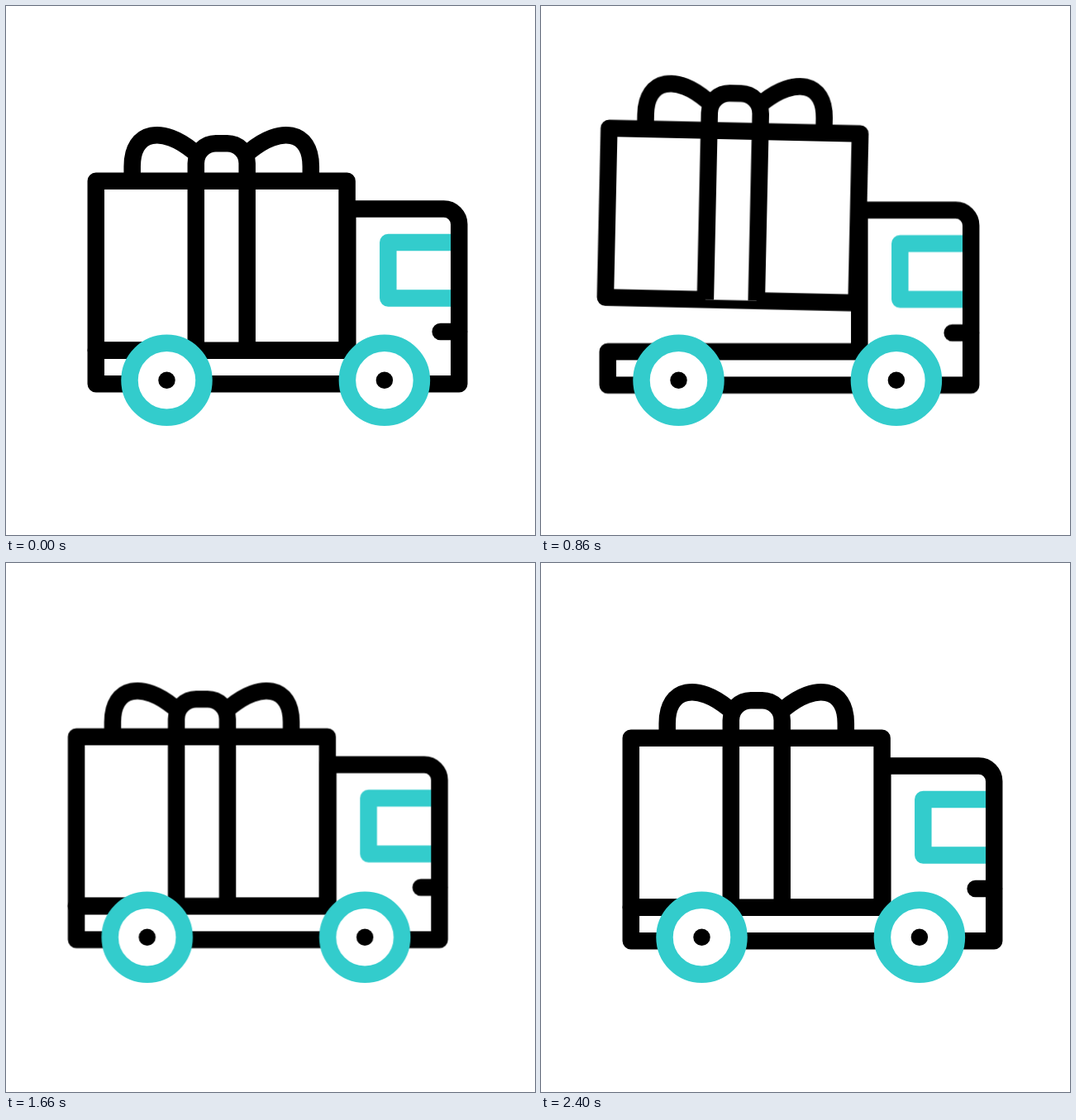
Recreate the animation shown at these times as an HTML page without scripts. Size 640 px wide and 640 px high, loop 2420 ms.

```html
<!DOCTYPE html>
<html lang="en">
<head>
<meta charset="utf-8">
<title>Gift delivery truck</title>
<style>
  html, body { margin: 0; width: 100%; height: 100%; overflow: hidden; background: #fff; }
  svg { display: block; width: 100%; height: 100%; }

  .line { fill: #fff; stroke: #000; stroke-width: 20.5; stroke-linejoin: round; }
  .open { fill: none; }
  .cyan { stroke: #3cc; }

  .truck, .body, .gift {
    animation: 2420ms cubic-bezier(.333, 0, .667, 1) infinite;
  }
  .truck { animation-name: drive; }
  .body { animation-name: rattle; }
  .gift { animation-name: hop; transform-origin: 260.7px 285px; }

  @keyframes drive {
    0%, 99.17%, 100% { transform: translateX(0); }
    24.79% { transform: translateX(-38.5px); }
    49.59% { transform: translateX(-12.6px); }
    74.38% { transform: translateX(-25.5px); }
  }

  @keyframes rattle {
    0%, 99.17%, 100% { transform: translateY(0); }
    4.13%, 14.05%, 41.32%, 52.07%, 61.98%, 73.55%, 85.95%, 95.04% { transform: translateY(-2.3px); }
    9.09%, 19.01%, 45.45%, 57.02%, 65.29%, 77.69%, 90.08% { transform: translateY(1.4px); }
    23.97%, 68.6% { transform: translateY(-1.5px); }
    29.75% { transform: translateY(-2.3px); }
    35.54% { transform: translateY(1.4px); }
    48.76% { transform: translateY(-.4px); }
    81.82% { transform: translateY(.6px); }
  }

  /* Thrown up, rocks in the air, drops back onto the bed */
  @keyframes hop {
    0%, 21.49%, 44.63%, 100% { transform: translateY(0) rotate(0deg); }
    26.45% { transform: translateY(-62px) rotate(-2.6deg); }
    39.67% { transform: translateY(-62px) rotate(2.4deg); }
  }
</style>
</head>
<body>
<svg viewBox="0 0 640 640">
  <defs>
    <path id="bow" class="line" d="M152.7 211V194C152.7 150 190 145 227 176"/>
    <g id="wheel">
      <circle class="line cyan" r="45"/>
      <circle r="10.25"/>
    </g>
  </defs>

  <g class="truck">
    <g class="body">
      <g class="gift">
        <use href="#bow"/>
        <use href="#bow" transform="matrix(-1 0 0 1 521.5 0)"/>
        <path class="line" d="M108.8 211.7H412.6V416.6H108.8Z"/>
        <path class="line" d="M229.8 416.6V190.3a24 24 0 0 1 24-24h13.9a24 24 0 0 1 24 24V416.6"/>
        <path class="line open" d="M229.8 211.7h61.9"/>
      </g>
      <path class="line" d="M413.3 416.7V245.6H529.7a18.5 18.5 0 0 1 18.5 18.5V457.2H108.8V416.7Z"/>
      <path class="line open cyan" d="M538 286.1H462.3V353.5H538"/>
      <path class="line open" stroke-linecap="round" d="M525.6 394.1H548"/>
    </g>
    <use href="#wheel" x="194.5" y="452.8"/>
    <use href="#wheel" x="457.9" y="452.8"/>
  </g>
</svg>
</body>
</html>
```
